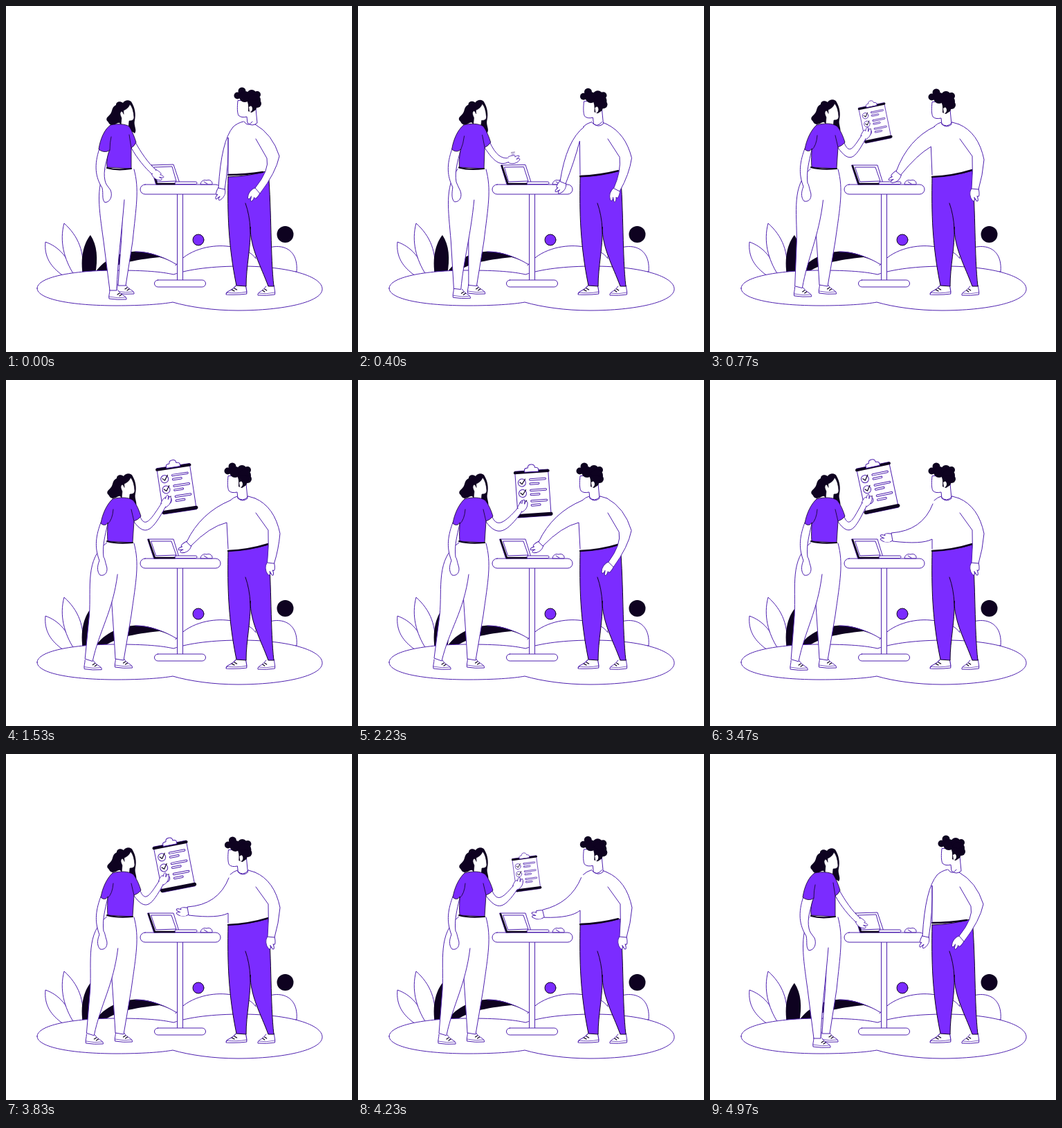
Animation, 500 px wide and 500 px high, one loop 5000 ms. Source, as an HTML page with a canvas:

```html
<!DOCTYPE html>
<html lang="en">
<head>
<meta charset="utf-8">
<title>Meeting at a standing desk</title>
<style>
html, body { margin: 0; width: 100%; height: 100%; overflow: hidden; background: #fff; }
canvas { display: block; }
</style>
</head>
<body>
<canvas id="stage" width="500" height="500"></canvas>
<script>
const ctx = document.getElementById('stage').getContext('2d');
const LOOP = 5000;
const WHITE = '#fff', VIOLET = '#7b2cff', DARK = '#0e0220', LINE = '#4d1fae';

const lerp = (a, b, k) => a + (b - a) * k;
const blend = (a, b, k) => a.map((v, i) => lerp(v, b[i], k));

// Smooth step from 0 at time a to 1 at time b; b may lie before a.
function ramp(a, b, t) {
  const u = Math.min(1, Math.max(0, (t - a) / (b - a)));
  return u * u * (3 - 2 * u);
}

const wave = (t, peak, period) => Math.cos((t - peak) / period * 2 * Math.PI);

function motion(t) {
  const sway = wave(t, 2250, 2600);
  const settle = ramp(0, 1050, t) * ramp(4970, 4050, t);
  const pose = ramp(0, 770, t) * ramp(4970, 4230, t);
  return {
    pose, settle,
    stride: settle * (.91 + .09 * sway),
    wrist: blend([214, 240], [228.5 + 5.5 * sway, 182 + 6 * wave(t, 2100, 2000)], settle),
    tilt: (4 * sway - 8) * Math.PI / 180,
    grow: ramp(250, 1000, t) * ramp(4700, 3980, t),
    upright: 1 - ramp(0, 700, t) * ramp(4970, 3700, t),
    bend: 1 - pose * (1 - .9 * ramp(1450, 2250, t) * ramp(3450, 2550, t)),
    raise: ramp(2400, 3400, t)
  };
}

// Blends two path strings with the same commands.
function mix(a, b, k) {
  const num = /-?\d+(\.\d+)?/g, to = b.match(num);
  let i = 0;
  return a.replace(num, v => lerp(+v, +to[i++], k).toFixed(2));
}

function draw(d, fill, stroke, width = 1) {
  const path = new Path2D(d);
  if (fill) { ctx.fillStyle = fill; ctx.fill(path); }
  if (stroke) { ctx.strokeStyle = stroke; ctx.lineWidth = width; ctx.stroke(path); }
}

function disc(x, y, r, fill, stroke) {
  const path = new Path2D();
  path.arc(x, y, r, 0, 7);
  draw(path, fill, stroke);
}

function pill(x, y, w, h) {
  const path = new Path2D();
  path.roundRect(x, y, w, h, h / 2);
  draw(path, WHITE, LINE);
}

function at(x, y, paint, angle = 0, sx = 1, sy = sx) {
  ctx.save();
  ctx.translate(x, y);
  ctx.rotate(angle);
  ctx.scale(sx, sy);
  paint();
  ctx.restore();
}

// A hand continues from the middle of a wrist; side picks the way it points.
function hand(x1, y1, x2, y2, side, size = 1) {
  const angle = Math.atan2((x2 - x1) * side, (y1 - y2) * side);
  at((x1 + x2) / 2, (y1 + y2) / 2, () =>
    draw('M-1 -5C5 -8 12 -7 17 -2C19 1 16 2 12 0L17 4C18 7 13 6 10 4C12 8 5 7 -1 5', WHITE, LINE),
  angle, size, size * side);
}

function shoe(x, y, flip = 1) {
  at(x, y, () => {
    draw('M0 0C0 5 -2 9 -1 13Q11 15 24 14C25 9 17 9 12 1', WHITE, LINE);
    draw('M-1 10Q12 13 23 11', null, LINE, .7);
    draw('M11 7L14 5M14 9L17 7', null, DARK, 1.2);
  }, 0, flip, 1);
}

function scenery() {
  draw('M129 385C145 361 177 351 203 356C219 359 232 366 247 374L247 390L129 390Z', DARK);
  draw('M139 387C158 372 184 367 222 363Q236 367 247 374L250 392L139 390Z', WHITE);
  draw('M187 355C210 355 233 365 247 374', null, LINE);
  draw('M360 364C372 342 424 336 420 384L360 384Z', WHITE, LINE);
  const bush = 'M245 375C262 352 295 345 318 347C341 349 354 355 361 365';
  draw(bush + 'L361 390L245 390Z', WHITE);
  draw(bush, null, LINE);
  disc(403.5, 330, 12, DARK);
  disc(278, 338, 8, VIOLET, DARK);
  draw('M83 390C64 377 55 362 57 341C77 348 91 364 98 390Z', WHITE, LINE);
  draw('M98 388C84 366 77 340 84 314C104 332 115 356 110 388Z', WHITE, LINE);
  draw('M111 388C107 365 112 343 122 331C132 346 133 365 129 388Z', DARK);
  draw('M45 408C45 392 95 382 160 382C200 382 225 384 242 388C265 380 300 376 340 376'
    + 'C410 376 457 391 457 409C457 428 400 440 335 440C300 440 265 435 241 428'
    + 'C225 431 195 433 160 433C95 433 45 424 45 408Z', WHITE, LINE);
}

function desk(k) {
  draw('M247.5 271V397H255.5V271', WHITE, LINE);
  pill(214.5, 396, 74, 10);
  pill(194, 258, 116, 14);
  draw(mix('M209 230L242 229L251 256L217 258Z', 'M205 230L242 230L250 256L214 258Z', k), WHITE, LINE);
  draw(mix('M214 233L240 232L246 253L219 254Z', 'M210 233L239 233L246 253L217 254Z', k), null, LINE);
  draw(mix('M210 231L218 257L244 257', 'M206 231L215 257L244 257', k), null, DARK, 2.5);
  pill(244, 254, 32, 3.5);
  draw('M281 257.5C282 252 286 251 290 252C295 250 299 254 298 257.5ZM286 254L291 257', WHITE, LINE);
}

function board() {
  draw('M-24 -34H24V33H-24Z', WHITE, LINE);
  draw('M-24 -32H24', null, DARK, 4);
  draw('M-24 30.5H24', null, DARK, 5);
  draw('M-10 -32V-36Q-9 -38 -5 -38C-5 -44 5 -44 5 -38Q9 -38 10 -36V-32Z', WHITE, LINE);
  for (const y of [-17, -1.5, 14]) {
    disc(-15, y, 5.5, WHITE, LINE);
    draw(`M-18 ${y - 1}L-15 ${y + 2}L-10 ${y - 5}`, null, DARK, 1.2);
    pill(-4, y - 5, 24, 2.5);
    pill(-4, y + 1, 14, 2.5);
  }
}

function woman({ pose, stride, wrist: [x, y], tilt, grow }) {
  shoe(lerp(161, 158.5, pose), 402);
  draw(mix('M185 236C193 265 188 290 183 340L173 404L162 404C164 370 168 330 168 305',
    'M185 236C193 265 188 290 181 340L170 405L158 403C156 365 153 330 152 305', pose), WHITE, LINE);
  shoe(lerp(150, 110, stride), lerp(410, 404, stride));
  draw(mix('M143 236C130 265 134 290 141 340L150 411L160 411C161 370 167 330 171 280',
    'M146 235C112 258 122 300 118 340L110 402L121 406C132 360 153 335 160 281', stride), WHITE, LINE);

  // resting arm
  draw(mix('M135 206C127 230 129 247 139 263C141 272 138 279 143 284C152 283 154 273 151 266C147 260 144 258 143 252C140 238 145 225 149 210',
    'M137 206C128 230 129 245 135 261C131 270 132 278 136 282C144 284 148 276 145 268C143 262 143 258 141 256C139 240 143 225 147 208', pose), WHITE, LINE);

  at(pose - 1, 1 - pose, () => {
    draw('M160 142C160 137 166 136 170 139C173 134 181 134 183 139C187 146 189 155 187 164C185 172 191 178 187 183'
      + 'C181 178 171 178 165 168C162 167 160 171 154 171C149 170 150 167 147 165C144 160 151 158 153 153C155 149 154 145 160 142Z', DARK);
    draw('M171 150Q178 147 180 141Q185 146 186 160Q186 165 179 165L178 174Q172 177 167 172L168 161Q164 153 168 151Q170 152 171 155Z', WHITE, DARK, .6);
  });

  if (grow > .01) {
    const hold = Math.sqrt(grow);
    at(x + 19 * hold, y - 23 * hold, board, tilt, grow);
  }

  // working arm, bent around the wrist
  const vx = lerp(-3, 3, pose), vy = lerp(3, 2.5, pose);
  const dx = pose * (x - 224) / 2, dy = pose * (y - 191) / 2;
  const upper = [x - vx, y - vy], lower = [x + vx, y + vy];
  const [a, b, c, d, e, f] = [
    [[187, 197], [194, 198]], [[194, 210], [201, 214]], [[206, 228], [207 + dx, 208 + dy]],
    [[201, 234], [210 + dx, 222 + dy]], [[190, 221], [202, 228]], [[181, 205], [185, 205]]
  ].map(([from, to]) => blend(from, to, pose));
  hand(...upper, ...lower, -1, .88);
  draw(`M${a}C${b} ${c} ${upper}L${lower}C${d} ${e} ${f}`, WHITE, LINE);
  disc(x, y, 3, WHITE);

  // shirt, sleeve folds, belt
  draw(mix('M151 172C160 170 172 170 178 174C182 180 186 190 188 197Q186 202 181 205L181 235L146 233C145 220 148 212 150 208C146 212 138 211 134 207C136 193 142 178 151 172Z',
    'M154 172C165 169 177 169 184 174C189 180 193 190 195 197Q191 202 185 204L183 235L147 233C146 222 147 215 147 206C145 210 141 211 137 207C139 195 145 180 154 172Z', pose), VIOLET, DARK, .8);
  draw(mix('M152 189Q150 197 150 208M178 186L181 205', 'M155 187Q154 202 147 208M181 187L185 204', pose), null, DARK, .8);
  draw(mix('M146 234Q160 238 181 235', 'M146 233Q160 237 183 235', pose), null, DARK, 2.2);
}

function manHead() {
  draw('M321 139C320 148 320 156 322 160Q326 164 334 162L335 171Q342 177 349 171L347 150Q348 140 338 138Z', WHITE, LINE);
  for (const [x, y, r] of [[327, 125, 5.5], [320.5, 131.5, 5], [331, 133, 8], [341, 130, 7], [349, 130, 5], [345, 138, 9], [349, 143, 6]])
    disc(x, y, r, DARK);
  draw('M333 136Q337 142 336 154L341 156L347 152L352 140Z', DARK);
  draw('M337 148Q341 144 342 150Q342 155 338 155L338 161L346 162L345 155Q341 158 338 155Z', WHITE);
}

function man({ settle, upright, bend, raise }) {
  shoe(346.5, 403, -1.18);
  shoe(387.5, 404, -.98);
  draw('M321 247C320 300 321 345 333 404L347 405C347 375 354 350 353 319C353 350 368 375 379 405L387 405C382 360 384 300 379 238Q352 246 321 247Z', VIOLET, DARK);
  draw('M346 285Q352 302 353 322', null, DARK);

  // shirt, shoulders, belt
  draw(mix('M334 168C328 170 323 174 321 190L321 247Q350 246 379 238L379 217L361 192L372 177Q358 171 350 168Z',
    'M343 167C330 170 325 174 321 190L321 244Q345 244 379 238L379 217L361 192L372 177Q362 170 356 167Z', upright), WHITE);
  draw(mix('M334 168Q328 170 324 174M350 168L360 171', 'M343 167Q334 169 328 175M356 167L360 171', upright), null, LINE);
  draw(mix('M321 247Q350 246 379 237', 'M321 244Q345 244 371 240', upright), null, DARK, 2.4);

  at(14 * upright, -2 * upright, manHead);
  draw(mix('M334 169Q342 178 350 168', 'M344 167Q350 176 356 167', upright), null, LINE);

  hand(...blend([388, 265, 378, 264], [367, 271, 360, 263], bend), -1);
  draw(mix('M360 171Q388 183 396 222Q394 245 388 265L378 264Q380 240 379 217L361 192',
    'M360 171Q385 185 395 217Q390 241 367 271L360 263Q381 237 377 220L361 192', bend), WHITE, LINE);

  // reaching arm: shoulder, outer elbow, wrist pair, inner elbow, armpit
  const hang = [328, 175, 311, 195, 307, 263, 316, 265, 322, 230, 321, 190];
  const point = [324, 174, 281, 192, 261, 234, 267, 240, 294, 212, 319, 206];
  const level = [322, 179, 307, 218, 262, 221, 264, 233, 306, 238, 321, 230];
  const [sx, sy, ox, oy, x1, y1, x2, y2, ix, iy, ax, ay] = blend(hang, blend(point, level, raise), settle);
  hand(x1, y1, x2, y2, 1, .95);
  draw(`M${sx} ${sy}Q${ox} ${oy} ${x1} ${y1}L${x2} ${y2}Q${ix} ${iy} ${ax} ${ay}L321 244`, WHITE, LINE);
}

function frame() {
  const now = motion(performance.now() % LOOP);
  ctx.fillStyle = WHITE;
  ctx.fillRect(0, 0, 500, 500);
  ctx.lineJoin = ctx.lineCap = 'round';
  scenery();
  desk(now.pose);
  woman(now);
  man(now);
  requestAnimationFrame(frame);
}
frame();
</script>
</body>
</html>
```
